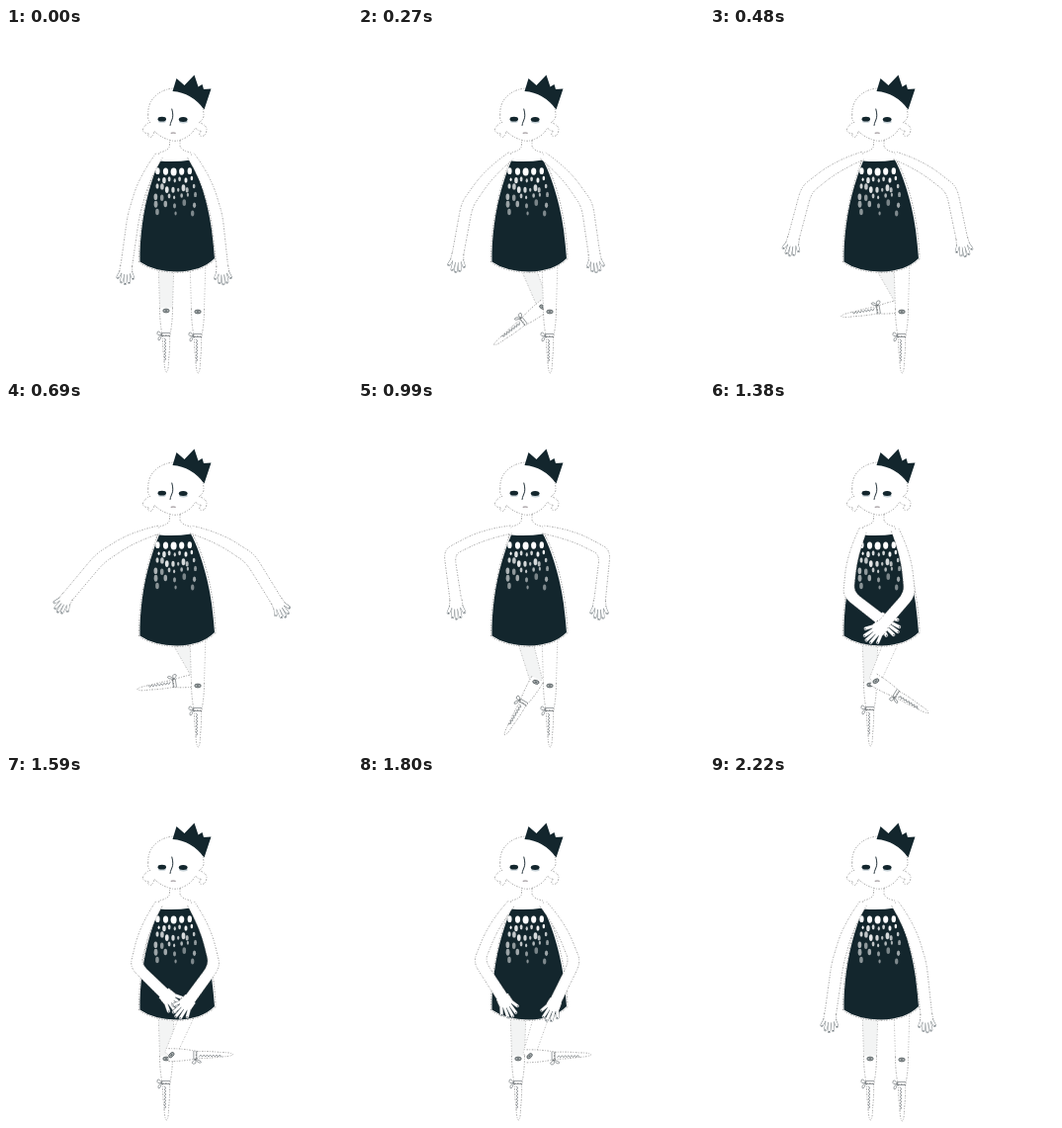
These frames come from a looping animation (350x350 px, 2610 ms). An HTML page:

```html
<!DOCTYPE html>
<html lang="en">
<head>
<meta charset="utf-8">
<title>Paper dancer</title>
<style>
html, body { margin: 0; width: 100%; height: 100%; overflow: hidden; background: #fff; }
svg { display: block; width: 100vw; height: 100vh; }
.line { fill: #fff; stroke: #666; stroke-width: .6; stroke-dasharray: 1.5 1.6 .8 1.3; stroke-linejoin: round; }
.open { fill: none; }
.ink { fill: #13262d; }
.thin { fill: none; stroke: #4c5458; stroke-width: .55; stroke-linecap: round; }
</style>
</head>
<body>
<svg viewBox="0 0 350 350">
  <defs>
    <filter id="soft" x="-20%" y="-20%" width="140%" height="140%"><feGaussianBlur stdDeviation=".6"/></filter>
  </defs>
  <g id="legs"></g>
  <path class="line" d="M165.500 112V119Q165 124 155 126L152 137H190L187 126Q177 124 176 119V112Z"/>
  <path class="ink" d="M155 134.500Q171 136 187 133.500C196 150 205 180 208 204Q210 220 211 233Q198 246 173 246.500Q149 246 135.500 236.500C135 213 139 183 146 160Q150 146 155 134.500Z"/>
  <path class="line open" d="M154 134C144 158 134 198 134.500 237Q149 247 173 247.300Q198 247 212 233.500C211 198 202 156 188 133"/>
  <g id="beads" fill="#fff" filter="url(#soft)"></g>
  <g id="arms"></g>
  <path class="line" d="M143.800 88Q143 73 156 65Q171 57 187 65Q200 74 200 89Q199 94 195 95.500Q203 98 203 103Q202 110 197 109.500Q194 107 198 104.500Q194 104 191.500 101Q187 110 175.500 113.500Q171 115 166 113.500Q155 110 150 104Q150 108 146 111Q142 109 145 106.500Q138 107 138.500 102Q142 96 146 95.500Q143 93 143.800 88Z"/>
  <path class="ink" d="M168.500 64L172.500 51L180.500 58L190.500 47.500L194.500 59.500L198.500 57L200 62L207.500 61.500L200.500 82.500Q188 65.500 168.500 64Z"/>
  <ellipse cx="157.800" cy="94.500" rx="4" ry="1.300" fill="#c3ced4"/>
  <ellipse cx="179.500" cy="95" rx="4.300" ry="1.400" fill="#c3ced4"/>
  <ellipse class="ink" cx="157.800" cy="92.200" rx="4.200" ry="2.400"/>
  <ellipse class="ink" cx="179.200" cy="92.500" rx="4.400" ry="2.500"/>
  <path class="thin" style="stroke:#25333b;stroke-width:1" d="M167.800 82Q169.800 89 167.800 93Q166 97 166 98.500"/>
  <path class="thin" style="stroke:#8d8488;stroke-width:1.100" d="M167.200 106.300Q169 105.600 171.200 106.300"/>
</svg>
<script>
const LOOP = 2610, STEP = 30, REST = 2220, HALF = REST / 2;
const RAD = Math.PI / 180;
const byId = id => document.getElementById(id);

function add(parent, tag, attrs = {}) {
  const el = document.createElementNS('http://www.w3.org/2000/svg', tag);
  for (const k in attrs) el.setAttribute(k, attrs[k]);
  parent.appendChild(el);
  return el;
}

function drawBeads() {
  let seed = 11;
  const rnd = () => (seed = seed * 16807 % 2147483647) / 2147483647;
  const bead = (cx, cy, rx, ry, opacity) => add(byId('beads'), 'ellipse', { cx, cy, rx, ry, opacity });
  for (let i = -2; i <= 2; i++) {
    const edge = Math.abs(i);
    bead(169.600 + 8.100 * i, 145.500 - edge * .4, 3 - edge * .4, 4 - edge * .3, 1);
  }
  // rows widen with the skirt, thin out and fade
  for (let row = 0; row < 5; row++) {
    const count = [7, 8, 7, 5, 3][row], half = 19 + row * 2;
    for (let i = 0; i < count; i++) {
      const size = 1 + rnd() * .9;
      bead(171 + half * (2 * (i + .5) / count - 1) + rnd() * 2 - 1, 154 + row * 8 + rnd() * 4 - 2,
        size, size * 1.800, 1 - row * .11 - rnd() * .25);
    }
  }
}

// Arm poses: time, then upper arm, forearm and hand in degrees outward from hanging
const ARM_POSES = [
  [0, 23, 8, 4],
  [480, 59, 15, 12],
  [690, 64, 40, 33],
  [750, 65, 43, 38],
  [990, 70, -8, -2],
  [1380, 13, -52, -54],
  [1800, 29, -33, -28],
  [REST, 23, 8, 4]
];

// Smooth interpolation that never overshoots a pose
function sample(keys, t) {
  const last = keys.length - 1;
  if (t >= keys[last][0]) return keys[last].slice(1);
  let i = 0;
  while (keys[i + 1][0] < t) i++;
  const a = keys[i], b = keys[i + 1], h = b[0] - a[0], u = (t - a[0]) / h;
  const slope = (k, c) => (keys[k + 1][c] - keys[k][c]) / (keys[k + 1][0] - keys[k][0]);
  const tangent = (k, c) => {
    if (k === 0 || k === last) return 0;
    const p = slope(k - 1, c), q = slope(k, c);
    return p * q <= 0 ? 0 : 2 * p * q / (p + q);
  };
  const u2 = u * u, u3 = u2 * u;
  return a.slice(1).map((v, n) => {
    const c = n + 1;
    return v * (2 * u3 - 3 * u2 + 1) + b[c] * (3 * u2 - 2 * u3)
      + h * (tangent(i, c) * (u3 - 2 * u2 + u) + tangent(i + 1, c) * (u3 - u2));
  });
}

const mix = (a, b, k) => [a[0] + (b[0] - a[0]) * k, a[1] + (b[1] - a[1]) * k];
const pt = p => p[0].toFixed(2) + ' ' + p[1].toFixed(2);
const reach = (p, deg, len) => [p[0] + Math.sin(deg * RAD) * len, p[1] + Math.cos(deg * RAD) * len];

// One edge of a limb, offset from its centre line
function offset(pts, widths, side) {
  return pts.map((p, i) => {
    const a = pts[Math.max(0, i - 1)], b = pts[Math.min(pts.length - 1, i + 1)];
    const dx = b[0] - a[0], dy = b[1] - a[1], k = side * widths[i] / Math.hypot(dx, dy);
    return [p[0] - dy * k, p[1] + dx * k];
  });
}

// Closed at the wrist, open at the shoulder
function armPath(pts, widths) {
  const [s, m, e, w] = offset(pts, widths, 1), [s2, m2, e2, w2] = offset(pts, widths, -1);
  return `M${pt(s)}Q${pt(m)} ${pt(mix(m, e, .5))}L${pt(mix(m, e, .82))}Q${pt(e)} ${pt(mix(e, w, .2))}L${pt(w)}`
    + `L${pt(w2)}L${pt(mix(e2, w2, .2))}Q${pt(e2)} ${pt(mix(m2, e2, .82))}L${pt(mix(m2, e2, .5))}Q${pt(m2)} ${pt(s2)}`;
}

function makeHand(parent) {
  const g = add(parent, 'g');
  for (let i = -2; i <= 2; i++) {
    const len = 15.500 - i * i * 1.400, x = i * 3.700;
    const d = `M${i * 2.100} 3L${x} ${len}`;
    add(g, 'path', { d, stroke: '#6b7478', 'stroke-width': 3, 'stroke-linecap': 'round' });
    add(g, 'path', { d, stroke: '#fff', 'stroke-width': 2.300, 'stroke-linecap': 'round' });
    add(g, 'circle', { cx: x, cy: len + .3, r: .6, fill: '#59636a' });
  }
  add(g, 'path', { d: 'M-5.500 -3L-6 3Q-4 7 0 7Q4 7 6 3L5.500 -3Z', fill: '#fff' });
  add(g, 'path', { d: 'M-5.500 -2L-6.300 4M5.500 -2L6.300 4', class: 'line open' });
  return g;
}

// out is -1 for the left arm and 1 for the right; bend scales the forearm swing
function makeArm(root, out, bend) {
  const g = add(byId('arms'), 'g');
  const skin = add(g, 'path', { class: 'line' });
  const hand = makeHand(g);
  return t => {
    const [upper, swing, wrist] = sample(ARM_POSES, t);
    const fore = swing * bend, inward = Math.max(0, -fore);
    const e = reach(root, out * upper, 67);
    const w = reach(e, out * fore, 52 - inward * .18);
    const m = reach(mix(root, e, .4), out * (upper + 90), 5);
    skin.setAttribute('d', armPath([root, m, e, w], [4, 5.400, 6, 5.800]));
    const grow = 1.050 + inward * .005;
    hand.setAttribute('transform', `translate(${pt(w)}) rotate(${-out * wrist * (bend + 1) / 2}) scale(${grow})`);
  };
}

const bump = (u, skew) => Math.sin(Math.PI * Math.pow(u, skew));

function makeLeg({ x, y, inward, begin, kick, travel, skew, hold, shade }) {
  const g = add(byId('legs'), 'g');
  const thigh = add(g, 'path', { class: 'line', style: `fill:${shade};stroke:#999` });
  const shin = add(g, 'g');
  add(shin, 'path', { class: 'line', d: 'M-6.500 -3Q-6.500 12 -3.800 25H3.800Q6.500 12 6.500 -3' });
  add(shin, 'path', { class: 'line', d: 'M-3.500 25Q-3.700 37 -2 49Q-1.700 61 .3 62Q2.500 61 2.500 50Q4 37 3.500 25Z' });
  // ribbon, bow and stitching of the shoe
  add(shin, 'path', { class: 'thin', d: 'M-4.500 22.500H3.800M-4.500 25.500H3.800M-4.500 24Q-8 19 -9 22Q-9.500 26 -4.500 24Q-9.500 28 -7.500 30Q-5.500 30 -4.500 24' });
  let stitch = 'M-2 28';
  for (let i = 1; i < 15; i++) stitch += `L${i % 2 ? 0 : -2} ${28 + i * 1.600}`;
  add(shin, 'path', { class: 'thin', d: stitch });
  const knee = add(g, 'g');
  add(knee, 'ellipse', { rx: 3.200, ry: 1.900, fill: '#aeb4b5', stroke: '#485154', 'stroke-width': .8 });
  add(knee, 'ellipse', { rx: 1.300, ry: .7, fill: '#5b6366' });

  return t => {
    const u = Math.min(1, Math.max(0, (t - begin) / HALF));
    const lift = Math.pow(Math.max(0, bump(u, skew)), hold);
    const turn = inward * kick * bump(u, 1.100);
    const kx = x + inward * travel * lift, ky = y - 5 * lift;
    const hx = x + (kx - x) * .3;
    thigh.setAttribute('d', `M${hx - 8} 236L${kx - 6.500} ${ky - 3}Q${kx} ${ky + 5} ${kx + 6.500} ${ky - 3}L${hx + 8} 236`);
    shin.setAttribute('transform', `translate(${kx} ${ky}) rotate(${turn})`);
    knee.setAttribute('transform', `translate(${kx} ${ky}) rotate(${turn / 2})`);
  };
}

drawBeads();
const parts = [
  makeLeg({ x: 162, y: 286, inward: 1, begin: 0, kick: 85, travel: 33, skew: 1.100, hold: .6, shade: '#f3f4f4' }),
  makeLeg({ x: 194, y: 287, inward: -1, begin: HALF, kick: 95, travel: 27.500, skew: .65, hold: 1, shade: '#fff' }),
  makeArm([155, 129], -1, 1),
  makeArm([187, 129], 1, .79)
];

const start = performance.now();
function tick() {
  const t = Math.floor((performance.now() - start) % LOOP / STEP) * STEP;
  parts.forEach(pose => pose(t));
  requestAnimationFrame(tick);
}
tick();
</script>
</body>
</html>
```
